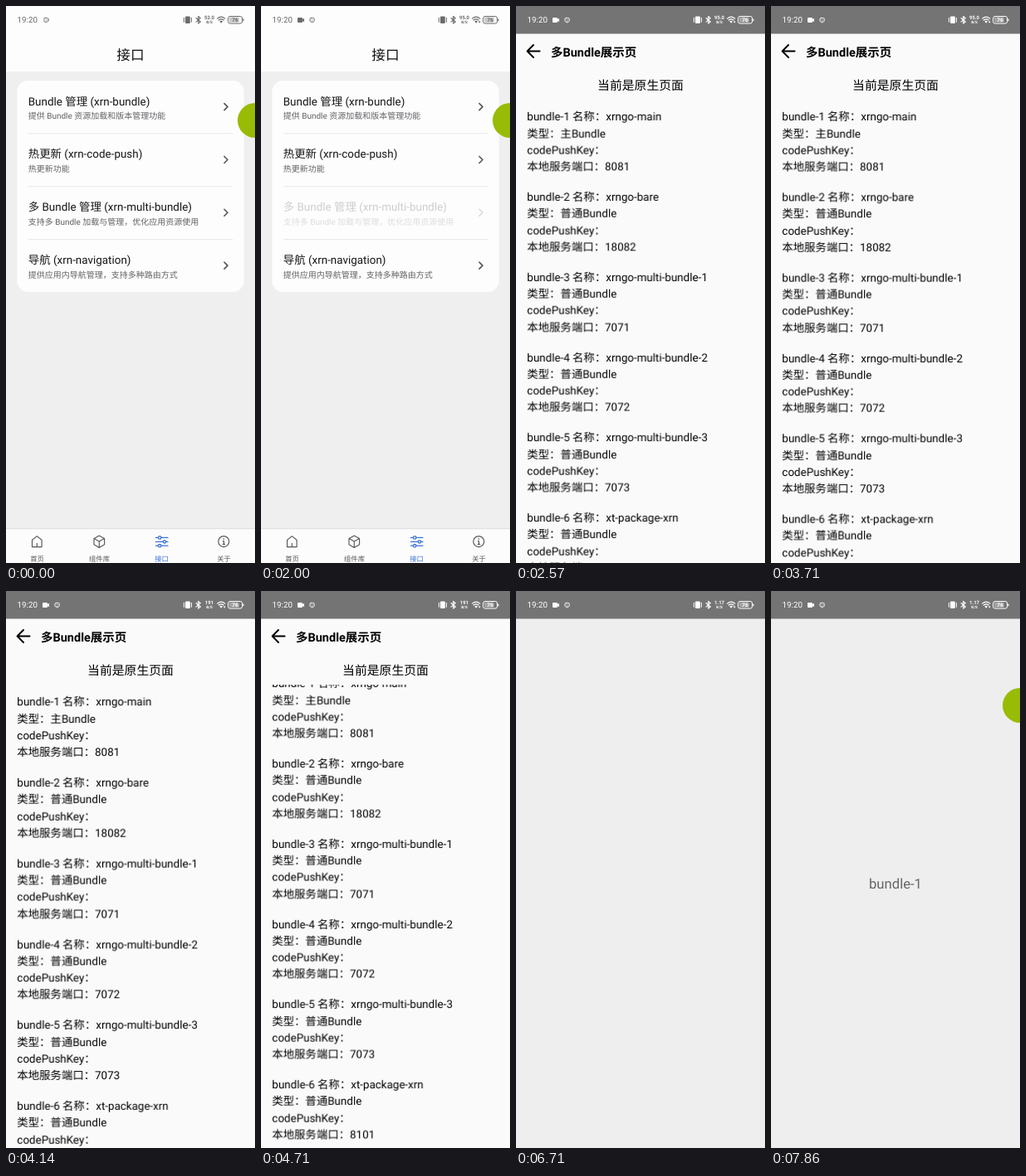
Animation, 300 px wide and 672 px high, one loop 8 s. Source, as an HTML page:

```html
<!DOCTYPE html>
<html lang="zh-CN">
<head>
<meta charset="utf-8">
<title>接口</title>
<style>
html, body { margin: 0; width: 100%; height: 100%; overflow: hidden; background: #eee; }
svg { display: block; width: 300px; height: 672px; }
text {
  font-family: Roboto, "Noto Sans CJK SC", "Noto Sans CJK", sans-serif;
  text-rendering: geometricPrecision;
}
.line { fill: none; stroke: currentColor; stroke-linecap: round; stroke-linejoin: round; }
.mid { text-anchor: middle; }
.title { font-size: 13.45px; fill: #161618; }
.sub { font-size: 10px; fill: #626266; }
.tab { font-size: 8.33px; fill: currentColor; }
.item { font-size: 13.4px; fill: #000; }

/* Every change is a hard step on one 8 s clock. */
.anim { animation: 8s step-end infinite; }
#home { animation-name: home; }
#list { animation-name: list; }
#bundle { animation-name: bundle; }
#dim { animation-name: dim; }
#rows { animation-name: scroll; transform-origin: 0 113px; }
#status { animation-name: ink; }
#robot { animation-name: shift; }
#cam { animation-name: cam; }
#arrow { animation-name: arrow; }
.pressed { animation-name: press; }
#s0 { animation-name: s0; } #s1 { animation-name: s1; }
#s2 { animation-name: s2; } #s3 { animation-name: s3; }
#paper { animation-name: paper; }
#bubble { animation-name: bubble; }
#label { animation-name: label; }

@keyframes home {
  0% { transform: none } 26.75% { transform: translateX(-4px) }
  28.625% { transform: translateX(-65px) } 30.375% { transform: translateX(-93px) }
  32.125%, 100% { transform: translateX(-300px) }
}
@keyframes list {
  0% { transform: translateX(300px) } 26.75% { transform: translateX(288px) }
  28.625% { transform: translateX(104px) } 30.375% { transform: translateX(20px) }
  32.125% { transform: none } 75% { transform: translateX(-4px) }
  76.75% { transform: translateX(-65px) } 78.625% { transform: translateX(-93px) }
  80.375%, 100% { transform: translateX(-300px) }
}
@keyframes bundle {
  0% { transform: translateX(300px) } 75% { transform: translateX(288px) }
  76.75% { transform: translateX(104px) } 78.625% { transform: translateX(20px) }
  80.375%, 100% { transform: none }
}
@keyframes dim { 0% { opacity: 0 } 75% { opacity: .005 } 76.75% { opacity: .04 } 78.625%, 100% { opacity: .06 } }
@keyframes scroll {
  0% { transform: none } 46.375% { transform: scaleY(1.003) }
  48.25% { transform: scaleY(1.008) } 50% { transform: scaleY(1.01) }
  51.75% { transform: scaleY(1.0075) } 53.625% { transform: scaleY(1.002) }
  55.375% { transform: translateY(-9px) } 57.125% { transform: translateY(-19px) }
  58.875%, 100% { transform: translateY(-22px) }
}
@keyframes press { 0% { opacity: 1 } 25% { opacity: .2 } 26.75% { opacity: .6 } 28.625%, 100% { opacity: 1 } }
@keyframes ink { 0% { color: #6b6b6b } 28.625%, 100% { color: #fff } }
@keyframes shift { 0% { transform: translateX(-13.5px) } 1.75%, 100% { transform: none } }
@keyframes cam { 0% { opacity: 0 } 1.75%, 100% { opacity: 1 } }
@keyframes arrow { 0% { opacity: 0 } 16.125%, 100% { opacity: 1 } }
@keyframes s0 { 0% { opacity: 1 } 14.25%, 100% { opacity: 0 } }
@keyframes s1 { 0% { opacity: 0 } 14.25% { opacity: 1 } 50%, 100% { opacity: 0 } }
@keyframes s2 { 0% { opacity: 0 } 50% { opacity: 1 } 75%, 100% { opacity: 0 } }
@keyframes s3 { 0% { opacity: 0 } 75%, 100% { opacity: 1 } }
@keyframes paper { 0% { fill: #f9f9f9 } 82.125%, 100% { fill: #eee } }
@keyframes bubble { 0% { opacity: 0 } 87.5%, 100% { opacity: 1 } }
@keyframes label { 0% { opacity: 0 } 98.25%, 100% { opacity: 1 } }
</style>
</head>
<body>
<svg viewBox="0 0 300 672">
  <defs>
    <clipPath id="listArea"><path d="M0 113.5H300V672H0z"/></clipPath>
    <circle id="ball" cx="300" cy="138" r="21" fill="#98bb05"/>
    <path id="bar" d="M0 0H300V33.4H0z" fill="#747474"/>
  </defs>

  <g id="home" class="anim">
    <path d="M0 0H300V672H0z" fill="#efeff0"/>
    <path d="M0 0H300V79H0z" fill="#fdfdfd"/>
    <text class="mid" x="150" y="65" font-size="16.67" fill="#111">接口</text>
    <rect x="13.3" y="90" width="273.4" height="255" rx="13.3" fill="#fdfdfd"/>
    <g id="menu"></g>
    <path d="M0 631H300V672H0z" fill="#fcfcfc"/>
    <path d="M0 630.7H300" stroke="#dedee0"/>
    <g color="#58585c">
      <g class="line" stroke-width="1.15">
        <path d="M31.5 644.2 37.3 639.6 43.1 644.2V652.6H31.5zM37.3 648.2V652.4"/>
        <path d="M112.3 639 118.6 642.5V649.8L112.3 653.4 106 649.8V642.5zM106.2 642.6 112.3 646.1 118.4 642.6M112.3 646.1V653.2"/>
        <circle cx="262.3" cy="646.1" r="6.5"/>
        <path d="M261.4 645.5H262.5V649.2M261.2 649.3H263.8"/>
      </g>
      <circle cx="262.3" cy="643" r=".85" fill="currentColor"/>
      <text class="tab mid" x="37.5" y="670">首页</text>
      <text class="tab mid" x="112.5" y="670">组件库</text>
      <text class="tab mid" x="262.5" y="670">关于</text>
    </g>
    <g color="#3b72d9">
      <path class="line" stroke-width="1.3" d="M180.5 641.4H195M180.5 646.3H195M180.5 651.2H195"/>
      <g class="line" stroke-width="1.3" style="fill:#fcfcfc">
        <circle cx="185.2" cy="641.4" r="1.7"/><circle cx="191" cy="646.3" r="1.7"/><circle cx="185.2" cy="651.2" r="1.7"/>
      </g>
      <text class="tab mid" x="187.5" y="670">接口</text>
    </g>
    <use href="#ball"/>
  </g>

  <g id="list" class="anim">
    <path d="M0 0H300V672H0z" fill="#fafafa"/>
    <path class="line" color="#000" stroke-width="1.9" d="M28.6 54.5H14M21 47 13.6 54.5 21 62"/>
    <text x="42" y="60.8" font-size="14.5" font-weight="700">多Bundle展示页</text>
    <text class="mid" x="150" y="101" font-size="14.85" fill="#000">当前是原生页面</text>
    <g clip-path="url(#listArea)"><g id="rows" class="anim"></g></g>
    <path id="dim" class="anim" d="M0 33H300V672H0z"/>
    <use href="#bar"/>
  </g>

  <g id="bundle" class="anim">
    <path id="paper" class="anim" d="M0 0H300V672H0z"/>
    <use href="#bar"/>
    <text id="label" class="anim mid" x="150" y="359.3" font-size="16.67" fill="#666">bundle-1</text>
    <use id="bubble" class="anim" href="#ball"/>
  </g>

  <g id="status" class="anim" fill="currentColor">
    <text x="13.5" y="20.4" font-size="9.8">19:20</text>
    <path id="cam" class="anim" d="M45 14H49Q50 14 50 15V16L52 14.7V19.3L50 18V19Q50 20 49 20H45Q44 20 44 19V15Q44 14 45 14z"/>
    <g id="robot" class="anim line" stroke-width=".9">
      <rect x="58.9" y="14.4" width="5.4" height="4.6" rx="1.4"/>
      <path d="M60.6 16.7H60.7M62.5 16.7H62.6M61.2 19.8H62"/>
    </g>
    <rect x="216" y="12.6" width="5.8" height="8.4" rx="1"/>
    <path class="line" stroke-width="1" d="M214.4 14.3V19.3M223.4 14.3V19.3"/>
    <path class="line" stroke-width="1.1" d="M229 14.5 234.3 19 231.7 21.2V12.4L234.3 14.6 229 19.1"/>
    <g id="speed" class="mid" font-weight="700"></g>
    <path class="line" stroke-width="1.2" d="M254.6 15.1Q259.2 11.3 263.8 15.1M256.2 17Q259.2 14.6 262.2 17"/>
    <path d="M257.3 18.4Q259.2 17 261.1 18.4L259.2 20.8z"/>
    <path id="arrow" class="anim" d="M261.8 18.6H264.6L263.2 20.7z"/>
    <rect class="line" x="267.6" y="12.5" width="17" height="8.6" rx="2.4" stroke-width="1"/>
    <rect x="269" y="13.8" width="11.8" height="6" rx="1.2" opacity=".35"/>
    <path d="M285.3 15.2Q286.7 15.2 286.7 16.8T285.3 18.4z"/>
    <text class="mid" x="276" y="19.2" font-size="6.6" font-weight="700">76</text>
  </g>
</svg>
<script>
const fill = (id, parts) => { document.getElementById(id).innerHTML = parts.join(''); };

const menu = [
  ['Bundle 管理 (xrn-bundle)', '提供 Bundle 资源加载和版本管理功能'],
  ['热更新 (xrn-code-push)', '热更新功能'],
  ['多 Bundle 管理 (xrn-multi-bundle)', '支持多 Bundle 加载与管理，优化应用资源使用'],
  ['导航 (xrn-navigation)', '提供应用内导航管理，支持多种路由方式'],
];
fill('menu', menu.map(([title, sub], i) => `
  <g transform="translate(0 ${i * 63.85})">
    <g class="${i === 2 ? 'anim pressed' : ''}">
      <text class="title" x="26.7" y="119.6">${title}</text>
      <text class="sub" x="26.7" y="136.4">${sub}</text>
      <path class="line" color="#555" stroke-width="1.6" d="M263 117.6 267 121.6 263 125.6"/>
    </g>
    ${i < 3 ? '<path d="M26.7 153.8H273.3" stroke="#e6e6e8" stroke-width=".9"/>' : ''}
  </g>`));

const bundles = [
  ['xrngo-main', 8081], ['xrngo-bare', 18082], ['xrngo-multi-bundle-1', 7071],
  ['xrngo-multi-bundle-2', 7072], ['xrngo-multi-bundle-3', 7073], ['xt-package-xrn', 8101],
];
fill('rows', bundles.flatMap(([name, port], i) => [
  `bundle-${i + 1} 名称：${name}`,
  `类型：${i ? '普通' : '主'}Bundle`,
  'codePushKey：',
  `本地服务端口：${port}`,
].map((line, j) => `<text class="item" x="13.3" y="${138.1 + i * 96.8 + j * 20.1}">${line}</text>`)));

const speeds = [['52.0', 'B/S'], ['95.0', 'B/S'], ['191', 'B/S'], ['1.17', 'K/S']];
fill('speed', speeds.map(([rate, unit], i) => `
  <g id="s${i}" class="anim">
    <text x="245" y="15.8" font-size="6">${rate}</text>
    <text x="245" y="21.3" font-size="4.6">${unit}</text>
  </g>`));
</script>
</body>
</html>
```
